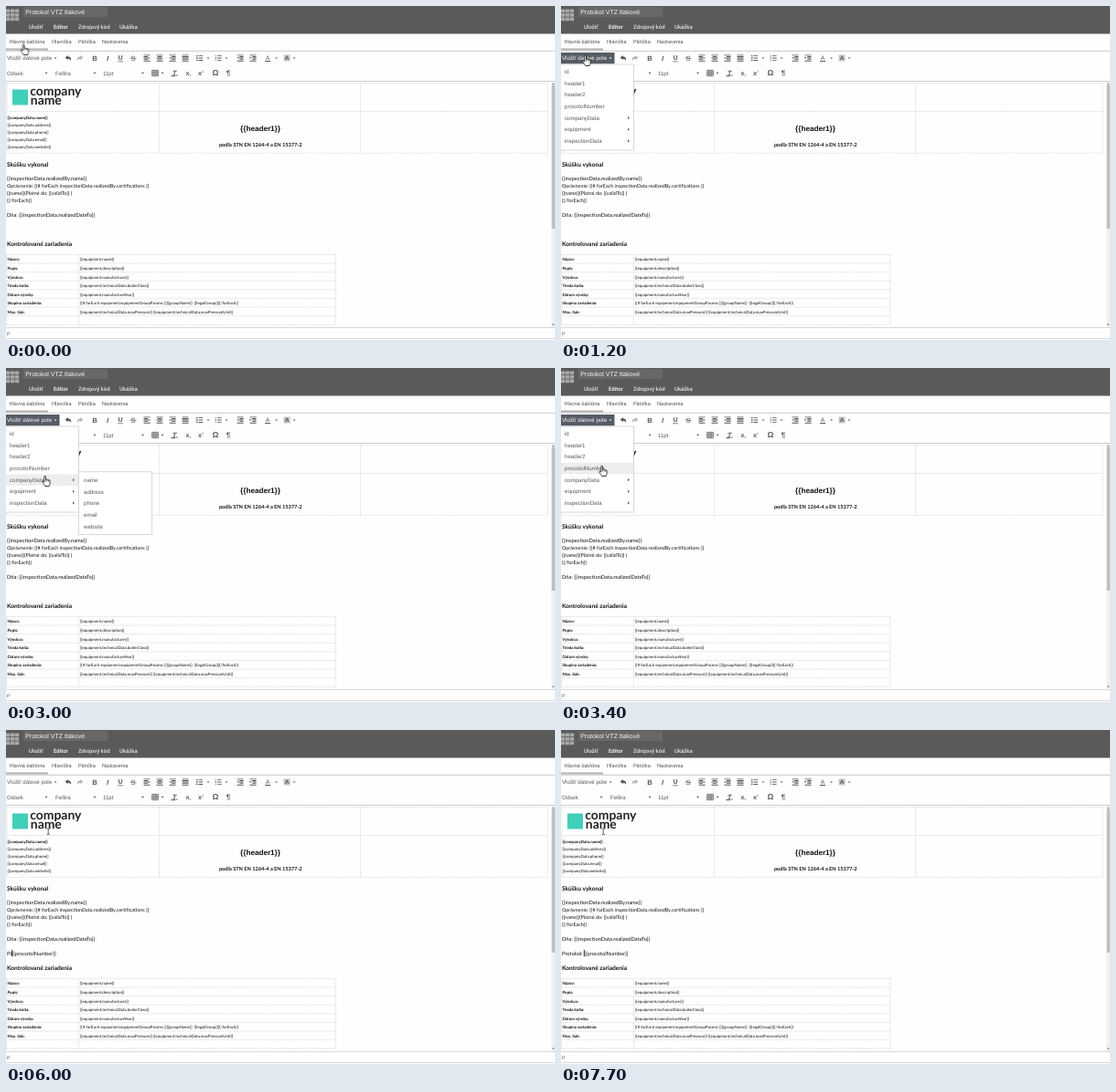
Write an HTML page that moves like this. It is 600 by 366 pixels and loops after 8 s.

```html
<!DOCTYPE html>
<html lang="sk">
<head>
<meta charset="utf-8">
<title>Editor</title>
<style>
html, body { margin: 0; width: 100%; height: 100%; overflow: hidden; background: #fefefe; }
svg { display: block; width: 600px; height: 366px; }
text { white-space: pre; text-rendering: geometricPrecision; }
.ui { font-family: "Liberation Sans", Arial, sans-serif; font-size: 6.15px; fill: #595959; }
.nav { font-family: Roboto, sans-serif; font-size: 6px; font-weight: 500; fill: #e4e4e4; }
.tab { font-family: Roboto, sans-serif; font-size: 5.7px; fill: #555; }
.doc { font-family: Lato, sans-serif; font-size: 5.76px; fill: #111; }
.mid { font-size: 5.4px; }
.small { font-size: 4.42px; }
.head { font-size: 6.6px; }
.bold { font-weight: 700; }
.center { text-anchor: middle; }
.grid { fill: none; stroke: #c4c4c4; stroke-width: .6; stroke-dasharray: 1.3 1; }
.icon { fill: #555; }

.cue { animation: 8s step-end infinite; }
#hand, #beam { animation: 8s step-end infinite; }
#hand { animation-name: point; }
#beam { animation-name: beam; }
#menu, #pressed { animation-name: menu; }
#sub, #rowA { animation-name: sub; }
#rowB { animation-name: rowB; }
#hot { animation-name: hot; }
@keyframes menu { 0%, 55%, 100% { opacity: 0 } 7.5% { opacity: 1 } }
@keyframes sub { 0%, 38.75%, 100% { opacity: 0 } 25% { opacity: 1 } }
@keyframes rowB { 0%, 55%, 100% { opacity: 0 } 38.75% { opacity: 1 } }
@keyframes hot { 0%, 7.5%, 100% { opacity: 0 } 3.75% { opacity: 1 } }
@keyframes beam { 0% { opacity: 0 } 55%, 100% { opacity: 1 } }
@keyframes point {
  0% { transform: translate(20.5px, 48px); opacity: 1 }
  1.25% { transform: translate(22px, 52px) }
  2.5% { transform: translate(25px, 56px) }
  3.75% { transform: translate(27px, 59px) }
  5% { transform: translate(28px, 60px) }
  17.5% { transform: translate(28px, 66px) }
  18.75% { transform: translate(35px, 96px) }
  20% { transform: translate(43px, 129px) }
  37.5% { transform: translate(44px, 124px) }
  38.75% { transform: translate(45px, 117px) }
  40% { transform: translate(46px, 114px) }
  41.25% { transform: translate(46px, 113px); opacity: 1 }
  55%, 100% { transform: translate(46px, 113px); opacity: 0 }
}
</style>
</head>
<body>
<svg viewBox="0 0 600 366">
  <rect width="600" height="366" fill="#fefefe"/>
  <g id="top">
    <rect width="600" height="30.5" fill="#5a5a5a"/>
    <rect x="19" y="1" width="92" height="11" fill="#686868"/>
    <path d="M0 49.3H600M0 82.5H600" stroke="#c6c6c6" stroke-width=".9"/>
    <rect y="46.5" width="46" height="2" fill="#b0b0b0"/>
    <path d="M0 352.5H600M0 364.5H600" stroke="#cfcfcf" stroke-width=".8"/>
  </g>
  <g id="page">
    <rect x="596" y="83" width="4" height="269" fill="#f1f1f1"/>
    <rect x="596.5" y="87" width="3.5" height="157" fill="#bfbfbf"/>
    <path d="M596.8 86.2h2.6l-1.3-1.7zM596.8 348.5h2.6l-1.3 1.7z" fill="#666"/>
    <path class="grid" d="M1 84.7H592V161.3H1zM1 115.5H592M167.5 84.7V161.3M387.5 84.7V161.3"/>
    <rect x="7" y="91.5" width="17" height="17" fill="#40cfb9"/>
  </g>
  <g id="line">
    <text id="typed" class="doc" x="1" y="246.7"></text>
    <text id="field" class="doc" y="246.7">{{procotolNumber}}</text>
    <rect id="caret" y="240.8" width=".8" height="7.4" fill="#111"/>
  </g>
  <g id="tools"></g>
  <rect id="hot" class="cue" x=".5" y="51" width="57.5" height="12" fill="none" stroke="#dadcdf" stroke-width=".6"/>
  <g id="pressed" class="cue"><rect x="0" y="51" width="58.5" height="12.3" fill="#555c66"/></g>
  <g id="menu" class="cue">
    <rect x="-1" y="64" width="80.5" height="94" fill="#fff" stroke="#c8c8c8" stroke-width=".7"/>
    <rect id="rowA" class="cue" y="116.4" width="79" height="12.6" fill="#ededed"/>
    <rect id="rowB" class="cue" y="103.7" width="79" height="12.6" fill="#ededed"/>
  </g>
  <g id="sub" class="cue">
    <rect x="79.3" y="113.8" width="80" height="68.7" fill="#fff" stroke="#c8c8c8" stroke-width=".7"/>
  </g>
  <g id="beam"><path d="M44.6 108.2h1.1l.5.4.5-.4h1.1M46.2 108.6v5.6M44.6 114.5h1.1l.5-.4.5.4h1.1" fill="none" stroke="#222" stroke-width=".7"/></g>
  <g id="hand">
    <path d="M-2.2-5c0-1.1 1.7-1.1 1.7 0v3.4c.3-.6 1.4-.5 1.6.2.4-.5 1.4-.3 1.5.4.5-.4 1.5-.2 1.5.7v2.6c0 1-.8 1.6-.9 3.2h-4.6c-.3-1.4-1.7-2.5-2.7-4.1-.7-1.1.5-1.7 1.2-1l.7.8z" fill="#fff" stroke="#111" stroke-width=".8" stroke-linejoin="round"/>
    <path d="M-.5-1.6V.6M1.1-1.4V.7M2.6-1V.8" stroke="#111" stroke-width=".5"/>
  </g>
</svg>
<script>
const $ = id => document.getElementById(id);

function add(parent, tag, attrs, body = '') {
  const el = document.createElementNS('http://www.w3.org/2000/svg', tag);
  for (const k in attrs) el.setAttribute(k, attrs[k]);
  el.textContent = body;
  $(parent).append(el);
  return el;
}
const text = (parent, cls, x, y, body, style = '') =>
  add(parent, 'text', { class: cls, x, y, style }, body);
const shape = (x, y, d, style = '') =>
  add('tools', 'path', { class: 'icon', d, style, transform: `translate(${x} ${y})` });

// Header and tabs
for (let i = 0; i < 9; i++)
  add('top', 'rect', { x: i % 3 * 4.9, y: 3.5 + Math.floor(i / 3) * 4.5, width: 4.4, height: 3.7, fill: '#a8a8a8' });
text('top', 'ui', 21.2, 9, 'Protokol VTZ tlakové', 'font-size:7px;fill:#f4f4f4');
[[25, 'Uložiť'], [52, 'Editor'], [79, 'Zdrojový kód'], [124, 'Ukážka']]
  .forEach(([x, s]) => text('top', 'nav', x, 25.2, s, s === 'Editor' ? 'fill:#fff' : ''));
[[3.4, 'Hlavná šablóna'], [50, 'Hlavička'], [79, 'Pätička'], [105, 'Nastavenia']]
  .forEach(([x, s]) => text('top', 'tab', x, 40.9, s));
text('top', 'ui', 1, 361.3, 'P', 'font-size:5.3px');

// Toolbar
const drop = (x, y) => shape(x, y, 'M-1.5-.8h3L0 .9z');
const bars = (x, y, rows) => shape(x, y, rows.map(([dx, w], i) =>
  `M${dx - 3.5} ${i * 1.6 - 3.6}h${w}v.9h-${w}z`).join(''));
const glyph = (x, y, s, style) => text('tools', 'ui center', x, y, s, 'font-size:7.6px;' + style);

text('tools', 'ui', 1, 59.3, 'Vložiť dátové pole');
text('tools', 'ui', 1, 75.6, 'Odsek');
text('tools', 'ui', 54, 75.6, 'Fellira');
text('tools', 'ui', 106, 75.6, '11pt');
[54, 221, 241, 295.5, 315].forEach(x => drop(x, 57.2));
[44, 97, 149.5, 171].forEach(x => drop(x, 73.5));

const undo = 'M-3.3-.4L-.3-3V-1.4C2.6-1.4 3.7.6 2.8 3 2.3 1.4 1.4.7-.3.7V2.2z';
shape(68, 57, undo);
shape(81, 57, undo, 'fill:#b5b5b5').setAttribute('transform', 'translate(81 57) scale(-1 1)');
glyph(97, 59.7, 'B', 'font-weight:700');
glyph(111, 59.7, 'I', 'font-style:italic;font-weight:700');
glyph(125, 59.2, 'U', 'font-size:7px;font-weight:700');
shape(125, 60.5, 'M-3 0h6v.7h-6z');
glyph(139, 59.7, 'S', '');
shape(139, 56.8, 'M-3.4 0h6.8v.7h-6.8z');

const wide = [0, 7];
const align = (x, short) => bars(x, 57, [wide, short, wide, short, wide]);
align(154, [0, 4.5]);
align(168, [1.2, 4.6]);
align(182, [2.5, 4.5]);
align(196, wide);
const items = [-2.8, -.4, 2];
shape(211.5, 57, items.map(y => `M-3.5 ${y - .3}h1.4v1.4h-1.4zM-1 ${y}h4.6v.9h-4.6z`).join(''));
shape(232, 57, items.map(y => `M-3.2 ${y - .5}h.7v1.8h-.7zM-1 ${y}h4.6v.8h-4.6z`).join(''));
for (const [x, arrow] of [[256, 'M-1.7-1.7v2.8L-3.5-.3z'], [270, 'M-3.5-1.7v2.8L-1.7-.3z']]) {
  const inset = [2.7, 4.3];
  bars(x, 57, [wide, inset, inset, inset, wide]);
  shape(x, 57, arrow);
}
glyph(286, 58.8, 'A', 'font-size:6.6px');
shape(286, 60, 'M-3 0h6v1h-6z');
shape(307, 57, 'M-3.5-3.5h7v7h-7z', 'fill:#c4c4c4');
glyph(307, 59.2, 'A', 'font-size:6.4px;font-weight:700');

shape(163, 73.4, 'M-3.3-3h6.6v6.2h-6.6zM-3.3-1h6.6M-3.3 1.1h6.6M-1.1-2.6V3.2M1.1-2.6V3.2',
  'fill:none;stroke:#555;stroke-width:.8');
glyph(184, 75.8, 'T', 'font-style:italic;font-weight:700');
shape(184, 76.2, 'M-3.2 0h4v.7h-4zM1.6-1.2l2 2M3.6-1.2l-2 2', 'stroke:#555;stroke-width:.5');
for (const [x, dy] of [[198.5, 77.2], [212, 72.5]]) {
  glyph(x, 75.5, 'x', 'font-size:7px;font-weight:700');
  glyph(x + 3, dy, '2', 'font-size:3.5px');
}
glyph(229, 76.4, 'Ω', 'font-size:8.6px;font-weight:700');
glyph(243, 76, '¶', 'font-size:8px;font-weight:700');

// Document
const logo = 'font-size:13.9px;fill:#222';
text('page', 'doc bold', 26.3, 97.8, 'company', logo);
text('page', 'doc bold', 26.8, 108.2, 'name', logo);
['name', 'address', 'phone', 'email', 'website'].forEach((s, i) =>
  text('page', 'doc small' + (i ? '' : ' bold'), 1.5, 124.3 + i * 7.9, `{{companyData.${s}}}`));
text('page', 'ui bold center', 278, 137.2, '{{header1}}', 'font-size:8.15px;fill:#111');
text('page', 'doc bold center', 278.3, 153.8, 'podľa STN EN 1264-4 a EN 15377-2', 'font-size:5.62px');
text('page', 'doc head bold', 1, 176.2, 'Skúšku vykonal');
text('page', 'doc', 1, 191.4, '{{inspectionData.realizedBy.name}}');
text('page', 'doc mid', 1, 199.3, 'Oprávnenie: {{# forEach inspectionData.realizedBy.certifications }}');
text('page', 'doc mid', 1, 207.1, '{{name}}(Platné do: {{validTo}} )');
text('page', 'doc mid', 1, 214.8, '{{/forEach}}');
text('page', 'doc', 1, 231, 'Dňa: {{inspectionData.realizedDateTo}}');
text('page', 'doc head bold', 1, 263.2, 'Kontrolované zariadenia');

const rowH = 9.6, tableY = 272.4;
let lines = 'M.5 272.4V349.2M79.5 272.4V349.2M360 272.4V349.2';
for (let i = 0; i < 9; i++) lines += `M.5 ${tableY + i * rowH}H360`;
add('page', 'path', { class: 'grid', d: lines });
const eq = s => `{{equipment.${s}}}`;
[
  ['Názov:', eq('name')],
  ['Popis:', eq('description')],
  ['Výrobca:', eq('manufacturer')],
  ['Trieda kotla:', eq('technicalData.boilerClass')],
  ['Dátum výroby:', eq('manufactureYear')],
  ['Skupina zariadenia:', '{{# forEach equipment.equipmentGroupParams }}{{groupName}}  {{legalGroup}}{{/forEach}}'],
  ['Max. tlak:', eq('technicalData.maxPressure') + ' ' + eq('technicalData.maxPressureUnit')]
].forEach(([label, value], i) => {
  const y = tableY + i * rowH + 6.9;
  text('page', 'doc small bold', 1.5, y, label);
  text('page', 'doc small', 81, y, value);
});

// Menus
const arrow = y => add('menu', 'path', { d: `M73 ${y - 1.6}v3.2l1.9-1.6z`, fill: '#555' });
text('pressed', 'ui', 1, 59.3, 'Vložiť dátové pole', 'fill:#fff');
add('pressed', 'path', { d: 'M52.5 56.4h3L54 58.1z', fill: '#fff' });
['id', 'header1', 'header2', 'procotolNumber', 'companyData', 'equipment', 'inspectionData'].forEach((s, i) => {
  const y = 72 + i * 12.65;
  text('menu', 'ui', 4, y + 2.1, s);
  if (i > 3) arrow(y);
});
['name', 'address', 'phone', 'email', 'website'].forEach((s, i) =>
  text('sub', 'ui', 85, 125.2 + i * 12.6, s));

// Typing
const word = 'Protokol: ';
const keys = [5900, 6000, 6300, 6500, 6700, 6900, 7100, 7300, 7600, 7700];
const start = performance.now();
function draw() {
  const t = (performance.now() - start) % 8000;
  const typed = $('typed'), field = $('field'), caret = $('caret');
  typed.textContent = word.slice(0, keys.filter(k => t >= k).length);
  const x = 1 + (typed.textContent ? typed.getComputedTextLength() : 0);
  field.setAttribute('x', x);
  caret.setAttribute('x', t < 4900 ? x + field.getComputedTextLength() : x - .3);
  $('line').style.opacity = t >= 4400 ? 1 : 0;
  caret.style.opacity = t >= 5300 && t < 5700 ? 0 : 1;
  requestAnimationFrame(draw);
}
draw();
</script>
</body>
</html>
```
